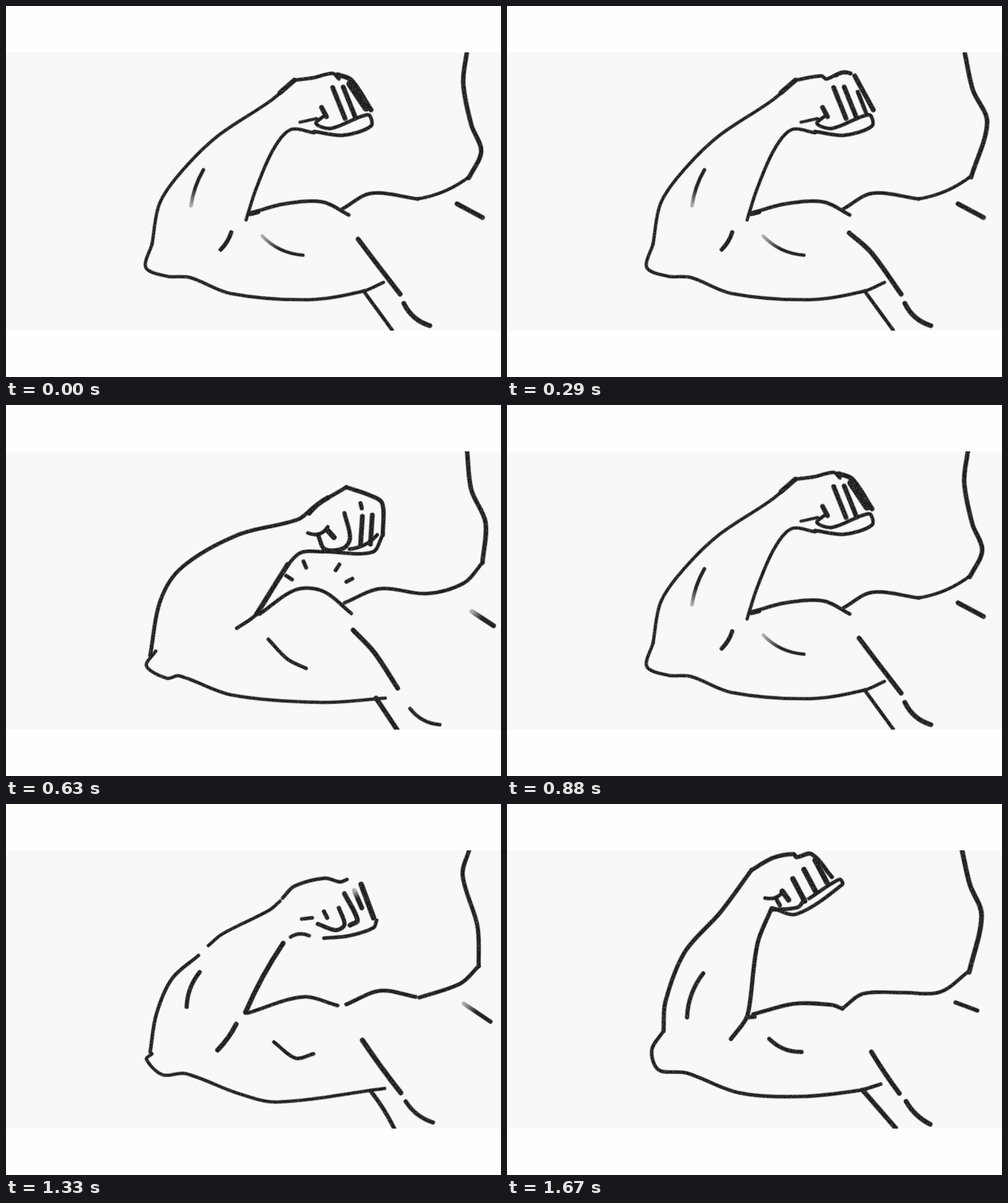
These frames come from a looping animation (800x600 px, 1.71 s). An HTML page with a canvas:

```html
<!DOCTYPE html>
<html lang="en">
<head>
<meta charset="utf-8">
<title>Flexing arm</title>
<style>
  html, body { margin: 0; width: 100%; height: 100%; overflow: hidden; background: #fefefe; }
  canvas { display: block; }
</style>
</head>
<body>
<canvas id="stage" width="800" height="600"></canvas>
<script>
const ctx = document.getElementById('stage').getContext('2d');
const LOOP = 1710;
const ELBOW = [232, 410];
let swing = 0; // extra forearm angle for the current drawing

function charcoal() {
  const tile = document.createElement('canvas');
  tile.width = tile.height = 96;
  const g = tile.getContext('2d');
  let seed = 7;
  const random = () => (seed = seed * 16807 % 2147483647) / 2147483647;
  g.fillStyle = '#1e1d1e';
  g.fillRect(0, 0, 96, 96);
  g.fillStyle = '#4a494a';
  for (let i = 0; i < 2200; i++) g.fillRect(random() * 96 | 0, random() * 96 | 0, 1, 1);
  return ctx.createPattern(tile, 'repeat');
}
const ink = charcoal();

// Turns a point about the elbow; the upper arm and torso stay put.
function place(x, y) {
  const a = x > 640 ? 0 : swing * Math.min(1, Math.max(0, (340 - y) / 100));
  const dx = x - ELBOW[0], dy = y - ELBOW[1], c = Math.cos(a), s = Math.sin(a);
  return [ELBOW[0] + dx * c - dy * s, ELBOW[1] + dx * s + dy * c];
}

// A dark core with a soft edge.
function rub(width, style = ink) {
  ctx.strokeStyle = style;
  for (const [spread, alpha] of [[1, 0.4], [-1, 1]]) {
    ctx.lineWidth = width + spread;
    ctx.globalAlpha = alpha;
    ctx.stroke();
  }
}

// Smooth line through a few key points.
function line(width, ...coords) {
  const p = [];
  for (let i = 0; i < coords.length; i += 2) p.push(place(coords[i], coords[i + 1]));
  const at = i => p[Math.min(p.length - 1, Math.max(0, i))];
  ctx.beginPath();
  ctx.moveTo(...p[0]);
  for (let i = 0; i < p.length - 1; i++) {
    const [a, b, c, d] = [at(i - 1), at(i), at(i + 1), at(i + 2)];
    const span = Math.hypot(c[0] - b[0], c[1] - b[1]);
    const before = Math.hypot(b[0] - a[0], b[1] - a[1]);
    const after = Math.hypot(d[0] - c[0], d[1] - c[1]);
    const k = span / (span + before) / 3, m = span / (span + after) / 3;
    ctx.bezierCurveTo(
      b[0] + (c[0] - a[0]) * k, b[1] + (c[1] - a[1]) * k,
      c[0] - (d[0] - b[0]) * m, c[1] - (d[1] - b[1]) * m, ...c);
  }
  rub(width);
}

// Dash from one point to another, bulging to the right of travel.
function bow(width, x1, y1, x2, y2, bulge = 0, faded = false) {
  const [ax, ay] = place(x1, y1), [bx, by] = place(x2, y2);
  const k = 2 * bulge / Math.hypot(bx - ax, by - ay);
  ctx.beginPath();
  ctx.moveTo(ax, ay);
  ctx.quadraticCurveTo((ax + bx) / 2 - (by - ay) * k, (ay + by) / 2 + (bx - ax) * k, bx, by);
  if (!faded) return rub(width);
  const fade = ctx.createLinearGradient(ax, ay, bx, by);
  fade.addColorStop(0, '#b0b0b0');
  fade.addColorStop(0.45, '#262526');
  rub(width, fade);
}

// Parallel finger lines, each one step from the last.
function fingers(count, width, x, y, stepX, stepY, dx, dy) {
  for (let i = 0; i < count; i++, x += stepX, y += stepY) bow(width, x, y, x + dx, y + dy);
}

// Short rays around the top of the biceps.
function strainMarks() {
  for (const degrees of [-147, -113, -57, -28]) {
    const a = degrees * Math.PI / 180;
    const ray = r => [505 + r * Math.cos(a), 310 + r * Math.sin(a)];
    bow(6.5, ...ray(51), ...ray(62));
  }
}

function middle() {
  line(5.5, 466,120, 428,153, 340,212, 280,272, 248,320, 236,385);
  line(5.5, 236,385, 226,423, 260,437, 297,439, 363,465, 490,475, 578,461, 610,447);
  bow(8, 443,140, 466,120);
  line(5.5, 388,346, 404,296, 432,232, 460,200, 498,205);
  bow(8, 395,336, 407,333);
  line(6, 395,335, 450,320, 512,317, 554,338);
  line(6, 544,328, 590,303, 665,312);
  bow(5.5, 665,312, 750,275, 6);
  bow(6, 299,323, 319,265, -3, true);
  bow(7, 347,394, 364,366, 2);
  bow(5.5, 414,372, 480,403, 7, true);
  bow(8, 729,320, 770,342);
  bow(8, 643,481, 685,517, 6);
  bow(6, 578,461, 624,524);
  fingers(2, 8, 528,132, 17,-1, 20,50);
  bow(5, 475,188, 502,182);
  bow(8, 510,164, 518,179);
  line(6, 515,177, 501,190, 525,198, 585,176, 590,194, 545,209, 498,203);
}

function closing() {
  middle();
  line(6, 466,120, 497,116, 528,109, 538,118);
  line(8, 536,111, 558,120, 590,168);
  bow(12, 556,126, 582,165);
  line(8, 569,377, 600,418, 637,466);
  line(7.5, 745,73, 739,125, 752,192, 768,235, 748,278);
}

function opening() {
  middle();
  line(6, 466,120, 508,113, 516,118, 532,111);
  bow(7, 532,112, 555,109, -3);
  bow(8, 562,113, 592,168);
  bow(7, 567,139, 580,172);
  line(8, 553,367, 588,398, 637,466);
  line(7.5, 740,77, 753,136, 776,188, 750,277);
}

function bent() {
  line(6, 447,152, 466,133, 515,120, 540,126, 551,122);
  line(5.5, 443,157, 425,172, 350,210, 327,229);
  line(6, 311,245, 268,283, 243,340, 233,401);
  line(5.5, 236,404, 227,413, 253,438, 290,436, 375,468, 438,482, 612,460);
  bow(8, 387,337, 448,225, -3);
  bow(7, 292,328, 313,272, -5);
  bow(8, 342,398, 372,356, 2);
  line(6, 433,385, 468,411, 497,404);
  line(6, 391,338, 480,312, 536,326);
  line(6.5, 550,324, 605,302, 662,312);
  line(6.5, 668,313, 735,290, 764,262);
  line(7, 749,73, 738,115, 762,198, 764,262);
  bow(7, 740,323, 783,352, 0, true);
  bow(8.5, 576,382, 638,467, 1);
  bow(7, 646,481, 690,515, 5);
  bow(7, 590,465, 628,526, -2);
  bow(6, 460,215, 490,213, -4);
  line(6, 514,217, 555,213, 594,200, 599,188);
  bow(6, 478,186, 495,184);
  bow(7, 514,174, 519,184);
  line(7, 504,194, 533,204, 547,195, 538,168);
  line(8, 547,145, 568,188, 556,196);
  bow(8, 563,140, 575,168, 0, true);
  bow(9, 574,130, 594,184);
}

function flexed() {
  line(6.5, 550,133, 500,163, 472,185, 375,210, 285,262, 250,315, 233,405);
  bow(8, 490,175, 520,150, -2);
  line(5.5, 242,398, 227,422, 260,442, 280,438, 365,469, 510,481, 613,474);
  line(6, 512,237, 474,240, 440,283, 405,338, 373,361);
  bow(8, 455,258, 405,338);
  line(6, 424,379, 455,411, 485,426);
  line(6, 410,338, 468,299, 512,301, 558,337);
  line(6, 547,320, 605,297, 680,305, 740,288, 770,255);
  line(7.5, 745,73, 752,137, 775,190, 770,255);
  bow(8, 753,334, 788,357, 0, true);
  line(8, 561,364, 595,400, 633,458);
  bow(6, 653,491, 701,517, 6);
  bow(8, 598,474, 632,525);
  line(7, 550,133, 588,146, 608,159, 609,210);
  line(6, 609,210, 592,238, 512,237);
  bow(6, 488,207, 520,197, 7);
  bow(9, 520,203, 530,214);
  line(7, 505,212, 515,233, 545,232, 556,215, 547,175);
  bow(7, 573,159, 575,167);
  fingers(2, 8, 576,180, 16,-2, -3,47);
  bow(6, 555,233, 600,210, 5);
  strainMarks();
}

function open() {
  line(7, 395,107, 345,175, 287,240, 256,320, 253,367);
  line(6, 253,367, 234,398, 245,430, 290,435, 375,467, 475,473, 570,463, 604,453);
  line(7, 427,170, 405,225, 392,325, 386,348, 362,380);
  bow(7, 291,345, 317,274, -6);
  bow(7, 424,380, 476,401, 6);
  bow(7, 388,345, 400,344);
  line(6.5, 398,340, 465,323, 525,325, 542,331);
  line(6, 542,331, 575,307, 640,305, 700,304, 747,270);
  line(8, 735,73, 748,130, 767,180, 747,272);
  bow(7, 725,321, 760,334);
  bow(8, 589,401, 634,468, 1);
  bow(8, 645,481, 684,518, 4);
  bow(8, 575,463, 628,524);
  line(7, 395,107, 430,87, 463,81, 468,86, 492,81, 525,118);
  fingers(3, 9, 462,121, 18,-15, 19,36);
  line(6.5, 481,153, 470,167, 430,171);
  bow(9, 445,141, 455,155);
  bow(6, 417,152, 446,142, 5);
  bow(7, 436,155, 441,164);
  line(6, 428,168, 468,178, 542,130, 537,122, 488,153);
}

// The pump: close, strain, open again; the swing loosens held poses.
const cycle = [
  [closing], [bent], [flexed, -0.012], [flexed, 0.012], [flexed],
  [bent], [opening], [open], [open, -0.02], [open]
];

function draw([pose, angle = 0]) {
  swing = angle;
  ctx.fillStyle = '#fefefe';
  ctx.fillRect(0, 0, 800, 600);
  ctx.fillStyle = '#f9f8f9';
  ctx.fillRect(0, 75, 800, 450);
  ctx.save();
  ctx.beginPath();
  ctx.rect(0, 75, 800, 450);
  ctx.clip();
  ctx.lineCap = ctx.lineJoin = 'round';
  pose();
  ctx.restore();
}

// 24 drawings a second on a 10 ms grid; the first is held for two.
const startOf = slot => Math.round(slot * 100 / 24) * 10;
function indexAt(time) {
  let slot = 1;
  while (startOf(slot + 1) <= time) slot++;
  return (slot - 1) % cycle.length;
}

let shown = -1;
function tick() {
  const index = indexAt(performance.now() % LOOP);
  if (index !== shown) draw(cycle[shown = index]);
  requestAnimationFrame(tick);
}
tick();
</script>
</body>
</html>
```
